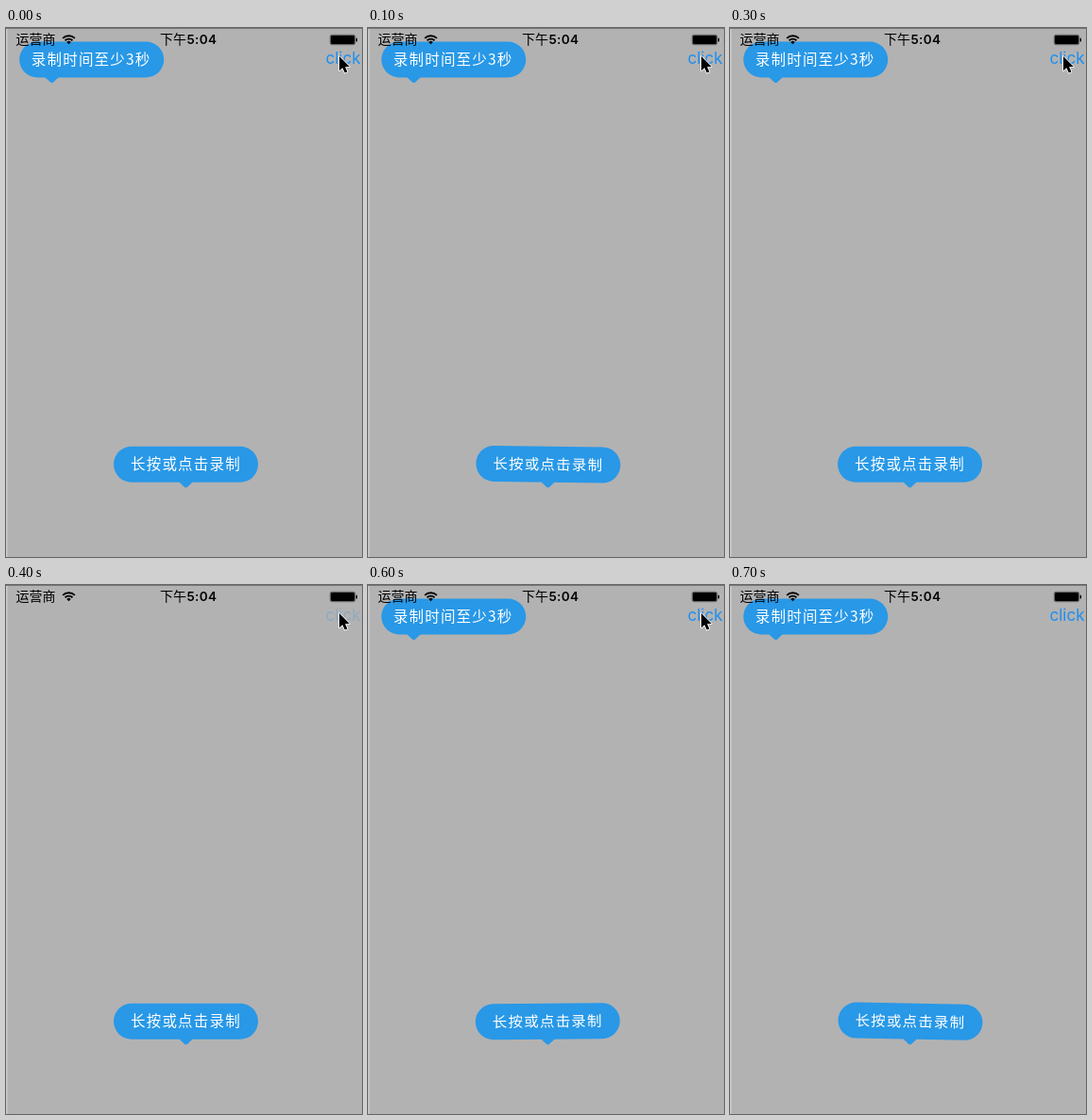
Animation, 377 px wide and 561 px high, one loop 800 ms. Source, as an HTML page with a canvas:

```html
<!DOCTYPE html>
<html lang="zh-CN">
<head>
<meta charset="utf-8">
<title>Tip bubbles</title>
<style>
html, body { margin: 0; width: 100%; height: 100%; overflow: hidden; background: #b2b2b2; }
canvas { display: block; }
</style>
</head>
<body>
<canvas id="stage" width="377" height="561"></canvas>
<script>
const ctx = document.getElementById('stage').getContext('2d');
const STEP = 100;
const BLUE = '#2898e7';
const CJK = '"Noto Sans CJK SC", "Noto Sans CJK", sans-serif';
const LATIN = 'Inter, sans-serif';

// One pose per step: tilt in degrees, top bubble offset (null = hidden)
const POSES = [
  { tilt: 0, top: 0, cursor: true },
  { tilt: 0.8, top: 0, cursor: true },
  { tilt: -0.6, top: 0, cursor: true },
  { tilt: 0, top: 0, cursor: true },
  { tilt: 0, top: null, cursor: true, pressed: true },
  { tilt: -0.6, top: 1, cursor: true },
  { tilt: -0.5, top: 0, cursor: true },
  { tilt: 1.1, top: 0, cursor: false }
];

function label(str, x, y, font, color, spacing = 0) {
  ctx.font = font;
  ctx.letterSpacing = spacing + 'px';
  ctx.fillStyle = color;
  ctx.fillText(str, x, y);
}

function polygon(points) {
  ctx.beginPath();
  points.forEach(([x, y]) => ctx.lineTo(x, y));
  ctx.closePath();
}

// The origin is the tip of the tail
function bubble(x, y, tilt, left, textX, str) {
  ctx.save();
  ctx.translate(x, y);
  ctx.rotate(tilt * Math.PI / 180);
  ctx.fillStyle = BLUE;
  ctx.beginPath();
  ctx.roundRect(left, -44, 153, 38, 19);
  ctx.fill();
  polygon([[-7.5, -6.5], [7.5, -6.5], [1, -0.5], [-1, -0.5]]);
  ctx.fill();
  label(str, textX, -19.3, '15.5px ' + CJK, '#fff', 1.2);
  ctx.restore();
}

function wifi(x, y) {
  ctx.strokeStyle = ctx.fillStyle = '#000';
  ctx.lineWidth = 1.9;
  const a = Math.PI * 0.25;
  for (const r of [5.6, 9]) {
    ctx.beginPath();
    ctx.arc(x, y, r, -Math.PI / 2 - a, -Math.PI / 2 + a);
    ctx.stroke();
  }
  ctx.beginPath();
  ctx.moveTo(x, y);
  ctx.arc(x, y, 3.2, -Math.PI / 2 - a, -Math.PI / 2 + a);
  ctx.fill();
}

function battery() {
  ctx.strokeStyle = '#333';
  ctx.lineWidth = 0.7;
  ctx.beginPath();
  ctx.roundRect(343.3, 7.3, 26.4, 10.4, 2);
  ctx.stroke();
  ctx.fillStyle = '#000';
  ctx.beginPath();
  ctx.roundRect(344, 8, 25, 9, 1.3);
  ctx.fill();
  ctx.fillRect(370.6, 10.8, 1.4, 3.6);
}

function statusBar() {
  label('运营商', 10.5, 17.3, '14px ' + CJK, '#000');
  wifi(66.5, 17.2);
  label('下午', 163, 17.3, '500 14px ' + CJK, '#000');
  label('5:04', 191.5, 17, '600 13.5px ' + LATIN, '#000', 0.3);
  battery();
}

function cursor() {
  polygon([[353, 30], [353, 45.3], [356.4, 42.2], [358.8, 47.6],
    [361.5, 46.4], [359.1, 41.2], [363.8, 41]]);
  ctx.lineJoin = 'round';
  ctx.strokeStyle = '#fff';
  ctx.lineWidth = 1.6;
  ctx.stroke();
  ctx.fillStyle = '#000';
  ctx.fill();
}

function draw(time) {
  const pose = POSES[Math.floor(time / STEP) % POSES.length];
  ctx.fillStyle = '#b2b2b2';
  ctx.fillRect(0, 0, 377, 561);
  ctx.fillStyle = '#cbcbcb';
  ctx.fillRect(0, 0, 1.5, 561);
  ctx.fillStyle = '#777';
  ctx.fillRect(0, 0, 377, 1);

  if (pose.top !== null) {
    bubble(48.5 + pose.top, 58.5, 0, -34.3, -21.7, '录制时间至少3秒');
  }
  bubble(190.5, 487.7, pose.tilt, -76.5, -58.5, '长按或点击录制');
  label('click', 338.5, 38.3, '17px ' + LATIN, pose.pressed ? '#91a9bd' : '#1b8ff0');
  statusBar();
  if (pose.cursor) cursor();
}

const start = performance.now();
function tick() {
  draw(performance.now() - start);
  requestAnimationFrame(tick);
}
tick();
</script>
</body>
</html>
```
